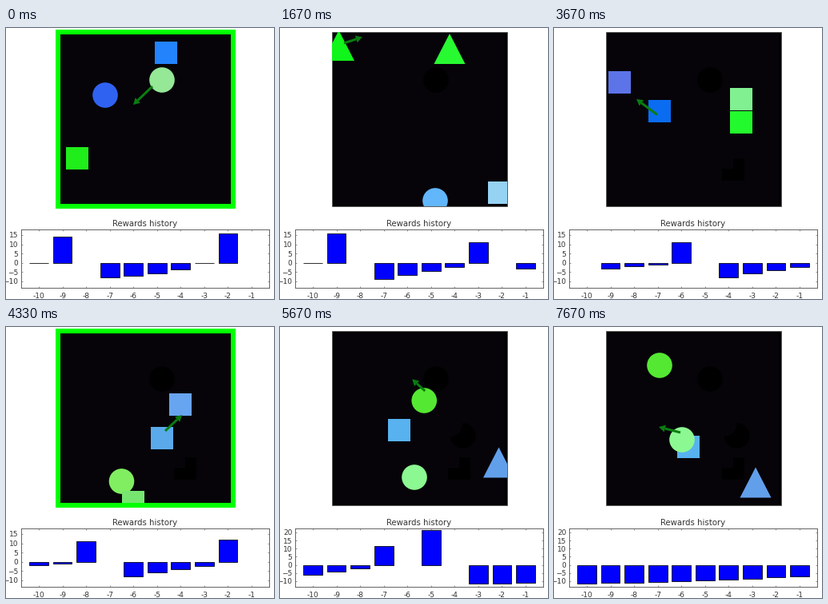
Animation of 335 by 339 pixels, one loop 8 s. Source, as a matplotlib script:

```python
import numpy as np
import matplotlib.pyplot as plt
from matplotlib.animation import FuncAnimation
from matplotlib.patches import Circle, Polygon, Rectangle

W, H, DPI = 335, 339, 100
PX = 72 / DPI
FLOOR, TRACE, ARROW = "#060409", "#000000", "#0a7d10"
INK, LINE = "#333333", "#555555"
SLOTS = range(-10, 0)
TALL_FROM = 18  # the step at which the chart needs a taller scale


class Thing:
    """A shape that moves evenly between key places, given as step: (x, y)."""

    def __init__(self, kind, color, keys, grip=(0, 0), trace=False):
        self.kind, self.color, self.trace = kind, color, trace
        self.grip = np.array(grip)
        self.steps = list(keys)
        self.xs, self.ys = zip(*keys.values())

    def at(self, step):
        return np.array([np.interp(step, self.steps, self.xs),
                         np.interp(step, self.steps, self.ys)])

    def move(self, step):
        return self.at(step + 1) - self.at(step)


EPISODES = {
    0: [Thing("square", "#20ee1a", {0: (89, 163)}),
        Thing("square", "#2283fc", {0: (200, 31)}),
        Thing("circle", "#3062f2", {1: (124, 84), 5: (173, 34)}, (4, -4)),
        Thing("circle", "#94e896", {0: (195, 65), 1: (171, 88)}, (-12, 8), True)],
    6: [Thing("triangle", "#28fa32", {6: (212, 26)}),
        Thing("circle", "#62b6fa", {6: (194, 216)}),
        Thing("square", "#96d2f2", {6: (273.7, 205.5)}),
        Thing("triangle", "#10f51a", {7: (73.5, 22), 10: (142, -1)}, (6.5, -3))],
    11: [Thing("square", "#5c74e8", {11: (82, 68)}),
         Thing("square", "#80f090", {11: (234, 89)}),
         Thing("square", "#23fa2d", {11: (234, 118)}),
         Thing("square", "#0a6cf0", {11: (224, 177), 12: (210, 162), 16: (106, 84)},
               (-3, 5), True)],
    17: [Thing("circle", "#80ee60", {17: (144.5, 193)}),
         Thing("square", "#76e670", {17: (159, 218.5)}),
         Thing("square", "#68a5f0", {17: (218, 96.5)}),
         Thing("square", "#5aaaeb", {17: (195, 139), 18: (216, 119)}, (4, -9))],
    19: [Thing("triangle", "#629feb", {22: (273.5, 169.5), 23: (252, 194.5)}),
         Thing("square", "#58b2f0", {25: (149, 129), 26: (168, 150)}, (14, -4)),
         Thing("circle", "#55e832", {19: (228.5, 136), 25: (132, 48)}, (1, -12), True),
         Thing("circle", "#8cf891", {26: (168, 188), 29: (160, 141),
                                     30: (160, 141), 31: (133, 134)}, (-2, -9))],
}


def costs(first, last, count, power=1):
    return list(-first + (first - last) * np.linspace(0, 1, count) ** power)


# Each episode costs less and less, then pays a prize and pauses once.
REWARDS = ([-0.25, 14.2, 0]
           + costs(7.7, 0.3, 5, 2) + [15.9, 0]
           + costs(8.6, 2.4, 4) + [11, 0]
           + costs(3, 0.9, 3) + [10.9, 0]
           + costs(7.8, 2.2, 4) + [11.8, 0]
           + [21.4, 0]
           + costs(11.6, 7.1, 11, 1.5))

fig = plt.figure(figsize=(W / DPI, H / DPI), dpi=DPI, facecolor="white")
stage = fig.add_axes([0, 0, 1, 1])
chart = fig.add_axes([19 / W, 1 - 325 / H, 310 / W, 73 / H])

bars = chart.bar(SLOTS, 0, 0.8, color="#0000ff", ec="black", lw=0.8 * PX)
chart.set_xlim(-10.75, -0.25)
chart.set_xticks(SLOTS, [str(n) for n in SLOTS])
chart.tick_params(direction="in", top=True, right=True, length=2.5 * PX,
                  width=0.6 * PX, pad=3.7 * PX, labelsize=9 * PX,
                  color=LINE, labelcolor=INK)
chart.tick_params(axis="x", pad=5.5 * PX)
chart.spines[:].set(linewidth=0.9 * PX, color=LINE)
chart.set_title("Rewards history", fontsize=10.1 * PX, pad=3.5 * PX, color=INK)


def outline(kind, place, color):
    x, y = place
    if kind == "circle":
        return Circle((x, y), 15.8, color=color, lw=0)
    if kind == "square":
        return Rectangle((x - 14, y - 14), 28, 28, color=color, lw=0)
    return Polygon([(x - 19.5, y + 19), (x, y - 19), (x + 19.5, y + 19)],
                   color=color, lw=0)


def draw_arrow(start, move):
    length = np.hypot(*move)
    along = move / length
    side = np.array([-along[1], along[0]])
    tip = start + move
    neck = tip - along * min(8, length)
    stage.plot(*zip(start, neck), color=ARROW, lw=3 * PX, solid_capstyle="butt")
    stage.add_patch(Polygon([tip, neck + 4.5 * side, neck - 4.5 * side],
                            color=ARROW, lw=0))


def draw_stage(step):
    stage.cla()
    stage.set(xlim=(0, W), ylim=(H, 0))
    stage.axis("off")
    arena = stage.add_patch(Rectangle((65, 5), 219, 218, fc=TRACE, ec=LINE,
                                      lw=0.8 * PX))
    stage.add_patch(Rectangle((68, 8), 213, 213, color=FLOOR, lw=0))

    def add(kind, place, color):
        stage.add_patch(outline(kind, place, color)).set_clip_path(arena)

    # A first move leaves a faint trace where the shape does not cover it again.
    for begin, things in EPISODES.items():
        for thing in things:
            if thing.trace and step > begin:
                add(thing.kind, thing.at(begin), TRACE)
                add(thing.kind, thing.at(begin + 1), FLOOR)

    begin = max(s for s in EPISODES if s <= step)
    things = EPISODES[begin]
    for thing in things:
        add(thing.kind, thing.at(step), thing.color)
    if step == begin:
        stage.add_patch(Rectangle((65, 5), 218.5, 218, fill=False, ec="#00ff00",
                                  lw=6 * PX, joinstyle="miter"))
    movers = [thing for thing in things if thing.move(step).any()]
    if movers:
        mover = movers[-1]
        draw_arrow(mover.at(step) + mover.grip, mover.move(step))


def draw_chart(step):
    for bar, value in zip(bars, REWARDS[step:step + 10]):
        bar.set_height(value)
        bar.set_visible(value != 0)
    tall = step >= TALL_FROM
    chart.set_ylim(-13.5, 22.4 if tall else 18)
    chart.set_yticks(range(-10, 21 if tall else 16, 5))


def draw(frame):
    picture = (3 * frame + 2) // 25       # three pictures a second
    step = (266 * picture + 77) // 200    # about four steps a second
    draw_stage(step)
    draw_chart(step)
    return []


anim = FuncAnimation(fig, draw, frames=200, interval=40, init_func=lambda: [],
                     repeat=True, repeat_delay=0)
plt.show()
```
